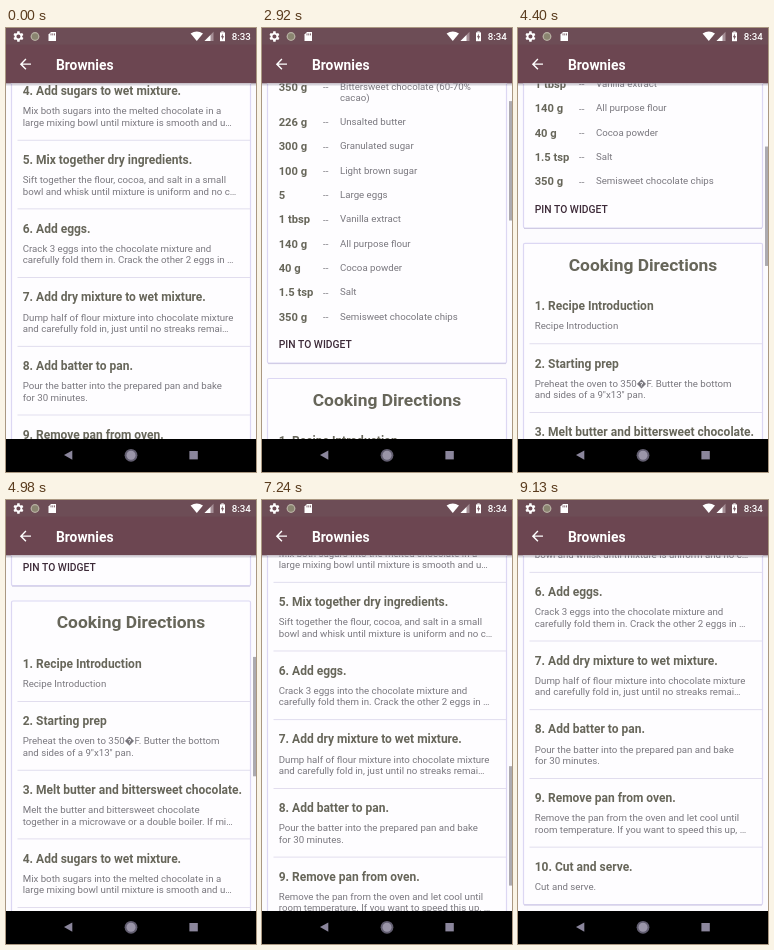
Recreate the animation shown at these times as an HTML page with a canvas. Size 250 px wide and 444 px high, loop 9.37 s.

```html
<!DOCTYPE html>
<html lang="en">
<head>
<meta charset="utf-8">
<title>Recipe screen</title>
<style>
html, body { margin: 0; width: 100%; height: 100%; overflow: hidden; background: #000; }
canvas { display: block; width: 250px; height: 444px; }
</style>
</head>
<body>
<canvas id="stage"></canvas>
<script>
const W = 250, H = 444, LOOP = 9370;
const TOP = 55.5, BOTTOM = 411, STATUS = 16.7, DP = 0.694;
const MAX_SCROLL = 703, START_SCROLL = 594.4;
const BAR = '#6c4651', STATUS_BG = '#6d4d56', PAGE = '#fcfbfe';
const BOLD = '#67665a', BODY = '#79777e', LINE = '#dad6ea';
const BODY_SIZE = 9.68;

const canvas = document.getElementById('stage');
const ctx = canvas.getContext('2d');
const ratio = window.devicePixelRatio || 1;
canvas.width = W * ratio;
canvas.height = H * ratio;

const ingredients = [
  ['350 g', 'Bittersweet chocolate (60-70%', 'cacao)'],
  ['226 g', 'Unsalted butter'],
  ['300 g', 'Granulated sugar'],
  ['100 g', 'Light brown sugar'],
  ['5', 'Large eggs'],
  ['1 tbsp', 'Vanilla extract'],
  ['140 g', 'All purpose flour'],
  ['40 g', 'Cocoa powder'],
  ['1.5 tsp', 'Salt'],
  ['350 g', 'Semisweet chocolate chips']
];

const steps = [
  ['Recipe Introduction', 'Recipe Introduction'],
  ['Starting prep', 'Preheat the oven to 350\uFFFDF. Butter the bottom', 'and sides of a 9"x13" pan.'],
  ['Melt butter and bittersweet chocolate.', 'Melt the butter and bittersweet chocolate', 'together in a microwave or a double boiler. If mi…'],
  ['Add sugars to wet mixture.', 'Mix both sugars into the melted chocolate in a', 'large mixing bowl until mixture is smooth and u…'],
  ['Mix together dry ingredients.', 'Sift together the flour, cocoa, and salt in a small', 'bowl and whisk until mixture is uniform and no c…'],
  ['Add eggs.', 'Crack 3 eggs into the chocolate mixture and', 'carefully fold them in. Crack the other 2 eggs in …'],
  ['Add dry mixture to wet mixture.', 'Dump half of flour mixture into chocolate mixture', 'and carefully fold in, just until no streaks remai…'],
  ['Add batter to pan.', 'Pour the batter into the prepared pan and bake', 'for 30 minutes.'],
  ['Remove pan from oven.', 'Remove the pan from the oven and let cool until', 'room temperature. If you want to speed this up, …'],
  ['Cut and serve.', 'Cut and serve.']
];

// Swipes: start ms, end ms, scroll position reached
const swipes = [
  [2310, 3210, 51],
  [3250, 3910, 175],
  [4320, 5230, 301],
  [5550, 6340, 467],
  [6710, 7570, 634],
  [8180, 8510, MAX_SCROLL]
];

const arrow = new Path2D('M20 11H7.83l5.59-5.59L12 4l-8 8 8 8 1.41-1.41L7.83 13H20z');
const gear = new Path2D('M19.4 13a7.8 7.8 0 0 0 0-2l2.1-1.6-2-3.5-2.5 1a7.3 7.3 0 0 0-1.7-1L15 3h-4l-.4 2.9a7.3 7.3 0 0 0-1.7 1l-2.5-1-2 3.5L6.5 11a7.8 7.8 0 0 0 0 2l-2.1 1.6 2 3.5 2.5-1a7.3 7.3 0 0 0 1.7 1L11 21h4l.4-2.9a7.3 7.3 0 0 0 1.7-1l2.5 1 2-3.5zM13 15.5a3.5 3.5 0 1 1 0-7 3.5 3.5 0 0 1 0 7z');

const clamp = (v) => Math.min(1, Math.max(0, v));
const span = (t, a, b) => clamp((t - a) / (b - a));
const easeOut = (u) => 1 - (1 - u) ** 2;
const swipeEase = (u) => {
  const v = easeOut(u);
  return v * v * (3 - 2 * v);
};

function scrollAt(t) {
  if (t < 400) return START_SCROLL;
  let pos = 0;
  for (const [a, b, to] of swipes) {
    if (t >= a) pos += (to - pos) * swipeEase(span(t, a, b));
  }
  return pos;
}

function rect(x, y, w, h, color) {
  ctx.fillStyle = color;
  ctx.fillRect(x, y, w, h);
}

function disc(x, y, r, color) {
  ctx.fillStyle = color;
  ctx.beginPath();
  ctx.arc(x, y, r, 0, Math.PI * 2);
  ctx.fill();
}

function poly(color, ...pts) {
  ctx.fillStyle = color;
  ctx.beginPath();
  for (let i = 0; i < pts.length; i += 2) ctx.lineTo(pts[i], pts[i + 1]);
  ctx.fill();
}

// y is the middle of the capital letters
function text(str, x, y, size, weight, color, align = 'left') {
  ctx.font = `${weight} ${size}px Roboto, "Noto Sans", sans-serif`;
  ctx.fillStyle = color;
  ctx.textAlign = align;
  ctx.fillText(str, x, y + size * 0.356);
}

function icon(path, x, y, scale, color) {
  ctx.save();
  ctx.translate(x, y);
  ctx.scale(scale, scale);
  ctx.fillStyle = color;
  ctx.fill(path, 'evenodd');
  ctx.restore();
}

function card(y, h) {
  ctx.beginPath();
  ctx.roundRect(5.5, y, W - 11, h, 1.4);
  ctx.fillStyle = '#fefdff';
  ctx.fill();
  ctx.strokeStyle = '#dcd7f3';
  ctx.lineWidth = 1.2;
  ctx.stroke();
  rect(6, y + h, W - 12, 0.9, '#cdc8e2');
}

function drawIngredients() {
  card(57, 327.7);
  text('Ingredients', 125.3, 72.5, 17.4, 'bold', BOLD, 'center');
  ingredients.forEach(([amount, ...lines], i) => {
    const y = i ? 143.4 + (i - 1) * 24.33 : 108.3;
    text(amount, 16.7, y, 11.2, 'bold', BOLD);
    text('--', 61, y, BODY_SIZE, 400, BODY);
    lines.forEach((s, k) => text(s, 78, y - 0.4 + k * 11.4, BODY_SIZE, 400, BODY));
  });
  text('PIN TO WIDGET', 16.7, 366.3, 10.3, 500, '#3d2a38');
}

function drawSteps() {
  card(400, 707.6);
  text('Cooking Directions', 125, 421.2, 17.4, 'bold', BOLD, 'center');
  let y = 462.7;
  steps.forEach(([title, ...lines], i) => {
    if (i) rect(11.5, y - 19.9, W - 17.5, 0.8, LINE);
    text(`${i + 1}. ${title}`, 16.7, y, 12, 'bold', BOLD);
    lines.forEach((s, k) => text(s, 16.7, y + 20 + k * 11.4, BODY_SIZE, 400, BODY));
    y += 45.9 + lines.length * 11.4;
  });
}

function drawScrollbar(t, pos) {
  if (t < 2310) return;
  const view = BOTTOM - TOP, range = view + MAX_SCROLL;
  ctx.globalAlpha = 1 - span(t, 8880, 9130);
  rect(247, TOP + 1 + pos * view / range, 3, view * view / range, '#acaab0');
  ctx.globalAlpha = 1;
}

function drawShell() {
  rect(0, 0, W, STATUS, STATUS_BG);
  rect(0, STATUS, W, TOP - STATUS, BAR);
  rect(0, TOP, W, BOTTOM - TOP, PAGE);
}

function drawDetail(t) {
  const pos = scrollAt(t);
  drawShell();
  ctx.save();
  ctx.beginPath();
  ctx.rect(0, TOP, W, BOTTOM - TOP);
  ctx.clip();
  ctx.translate(0, -pos);
  drawIngredients();
  drawSteps();
  ctx.restore();
  drawScrollbar(t, pos);

  const shade = ctx.createLinearGradient(0, TOP, 0, TOP + 3);
  shade.addColorStop(0, 'rgba(60,50,80,.3)');
  shade.addColorStop(1, 'rgba(60,50,80,0)');
  rect(0, TOP, W, 3, shade);

  icon(arrow, 11.1, 27.8, DP, '#fff');
  text('Brownies', 50, 36.9, 13.8, 'bold', '#fff');
}

function drawStatusIcons(t) {
  icon(gear, 4.9, 1.5, 0.58, '#fff');
  disc(29, 8.5, 4.4, '#b9b2a4');
  disc(29, 8.5, 3.2, '#8a8570');
  poly('#fff', 45, 4, 50, 4, 50, 13, 42.5, 13, 42.5, 6.5);
  for (let i = 0; i < 3; i++) rect(44.6 + i * 1.8, 5.4, 0.8, 2, STATUS_BG);

  ctx.fillStyle = '#fff';
  ctx.beginPath();
  ctx.moveTo(190.8, 13);
  ctx.lineTo(184.6, 5.6);
  ctx.quadraticCurveTo(190.8, 1.6, 197, 5.6);
  ctx.fill();
  poly('#a58f96', 207.5, 3.8, 207.5, 13, 198.5, 13);
  poly('#fff', 204.5, 6.9, 204.5, 13, 198.5, 13);
  rect(214, 4.4, 5, 8.8, '#fff');
  rect(215.3, 3.4, 2.4, 1.2, '#fff');
  poly(STATUS_BG, 216.9, 5.6, 214.9, 9.2, 216.2, 9.2, 216, 12, 218.1, 8.3, 216.7, 8.3);
  text(t < 900 ? '8:33' : '8:34', 244.8, 8.8, 9.72, 500, '#fff', 'right');
}

function drawNav() {
  rect(0, BOTTOM, W, H - BOTTOM, '#000');
  const tint = '#8b869c';
  poly(tint, 66.3, 422.4, 66.3, 431.8, 58, 427.1);
  disc(125, 427.3, 6.4, '#625e70');
  disc(125, 427.3, 4.5, '#9a95a8');
  rect(183.4, 423, 8.4, 8.4, tint);
}

function draw(t) {
  ctx.setTransform(ratio, 0, 0, ratio, 0, 0);
  let alpha = 1, shift = 0;
  if (t < 1360) {
    const closing = t < 400;
    alpha = closing ? 1 - span(t, 140, 290) : span(t, 960, 1160);
    shift = 28.5 * (closing ? easeOut(span(t, 40, 290)) : (1 - span(t, 960, 1340)) ** 3);
  }

  drawShell();
  if (alpha > 0) {
    ctx.save();
    ctx.translate(0, shift);
    drawDetail(t);
    ctx.restore();
    ctx.globalAlpha = 1 - alpha;
    if (alpha < 1) drawShell();
    ctx.globalAlpha = 1;
  }
  drawStatusIcons(t);
  drawNav();
}

const start = performance.now();
function tick() {
  draw((performance.now() - start) % LOOP);
  requestAnimationFrame(tick);
}
tick();
</script>
</body>
</html>
```
